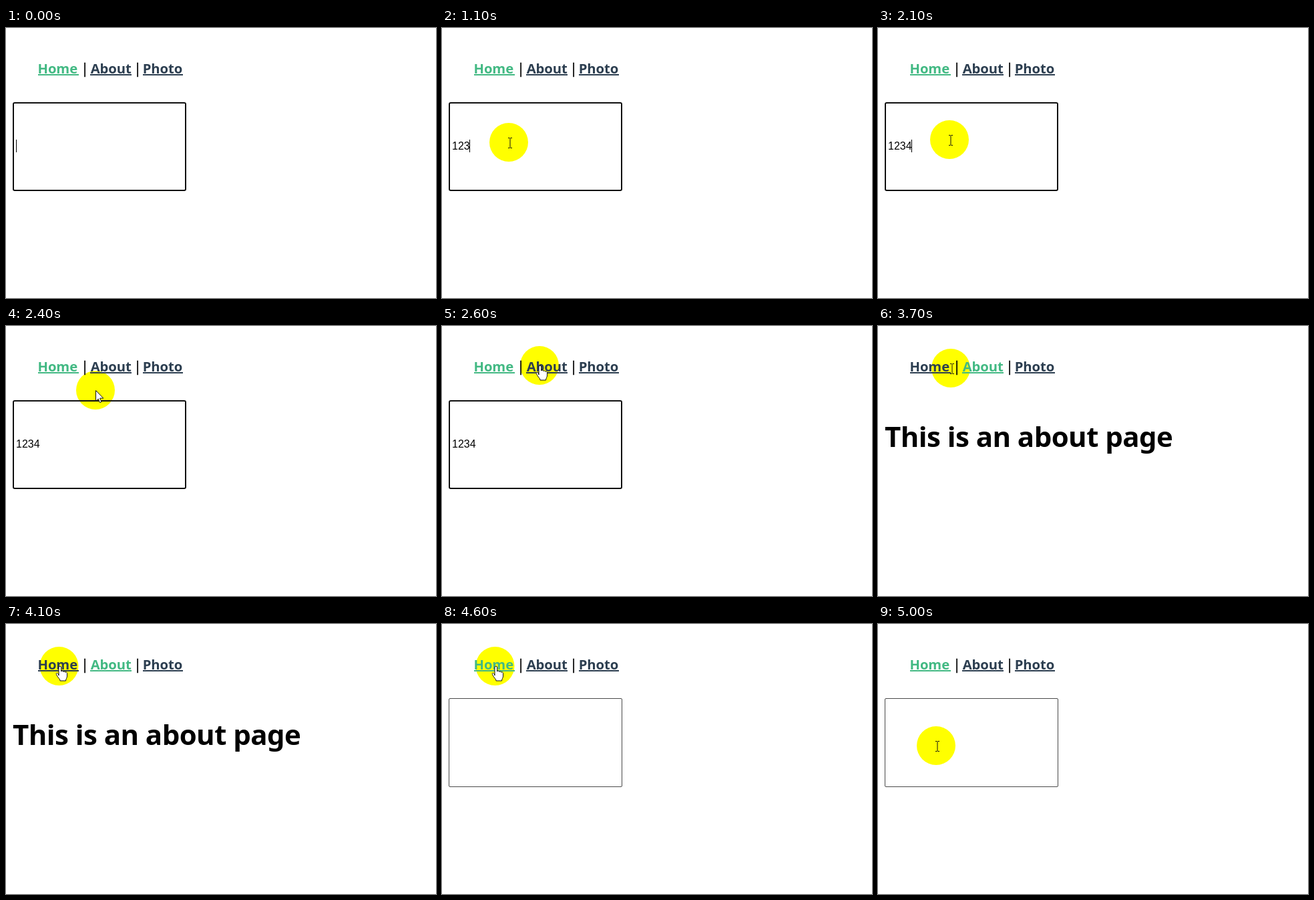
These frames come from a looping animation (644 px wide and 404 px high, 6000 ms). An HTML page:

```html
<!DOCTYPE html>
<html lang="en">
<head>
<meta charset="utf-8">
<title>Page navigation</title>
<style>
html, body { margin: 0; width: 100%; height: 100%; overflow: hidden; background: #fff; }
svg { display: block; width: 644px; height: 404px; }
.nav text { font: 700 20.3px "Noto Sans", "Open Sans", sans-serif; letter-spacing: -.1px; }
.nav .bar { font-weight: 400; font-size: 21.3px; letter-spacing: 0; text-anchor: middle; stroke: #000; stroke-width: .3; }
.link { fill: #2c3e50; }
.link.active { fill: #42b983; }
.title { font: 700 42px "Noto Sans", "Open Sans", sans-serif; letter-spacing: -.56px; }
.value { font: 16px "Liberation Sans", Arial, sans-serif; }
.spot { fill: #ff0; }
.pointer path { stroke: #111; stroke-width: 1; fill: none; }
.pointer .solid { fill: #fff; stroke-linejoin: round; }
</style>
</head>
<body>
<svg viewBox="0 0 644 404">
  <circle class="spot" id="spot" r="29"/>
  <g class="nav">
    <g class="link" id="home"><text x="47.5" y="68">Home</text><rect x="48" y="69" width="61" height="2"/></g>
    <text class="bar" x="118" y="68">|</text>
    <g class="link" id="about"><text x="126.7" y="68">About</text><rect x="126" y="69" width="62" height="2"/></g>
    <text class="bar" x="197" y="68">|</text>
    <g class="link"><text x="204.7" y="68">Photo</text><rect x="205" y="69" width="60" height="2"/></g>
  </g>
  <rect id="focused" x="11" y="112" width="258" height="131" rx="2" fill="none" stroke="#101010" stroke-width="2"/>
  <rect id="blurred" x="10.5" y="111.5" width="259" height="132" rx="1.5" fill="none" stroke="#4a4a4a"/>
  <text class="value" id="value" x="15" y="182"></text>
  <rect id="caret" y="167" width="1" height="19"/>
  <text class="title" id="title" x="10" y="180.5">This is an about page</text>
  <g class="pointer" id="pointer">
    <path id="beam" d="M-1 -6.5h2.5M2.5 -6.5h2.5M2 -6v14M-1 8.5h2.5M2.5 8.5h2.5"/>
    <path id="hand" class="solid" d="M-1 14V2a1.8 1.8 0 0 1 3.6 0V8a1.7 1.7 0 0 1 3.2 .6a1.7 1.7 0 0 1 3 .8a1.6 1.6 0 0 1 2.7 1.2V15c0 3-2 4-2 7H1c0-3-3-4-5.5-9.5c-1-2 1.2-3 2.4-1.2z"/>
    <path id="arrow" class="solid" d="M.5 .5v16l3.7-3.5 2.4 5.6 2.4-1-2.4-5.5h5.2z"/>
  </g>
</svg>
<script>
const LOOP = 6000, TICK = 100;
const el = id => document.getElementById(id);
const show = (id, on) => el(id).setAttribute("visibility", on ? "visible" : "hidden");

// time, x, y
const path = [
  [2000, 100, 171], [2100, 107, 167], [2300, 125, 124], [2500, 143, 68],
  [2600, 146, 59], [2700, 149, 57], [3100, 150, 55], [3400, 157, 56],
  [3500, 146, 54], [3700, 109, 63], [3900, 90, 67], [4000, 78, 65],
  [4100, 79.5, 63], [4600, 79.5, 63], [4700, 79, 74], [4800, 78, 98],
  [4900, 91, 150], [5000, 87, 182]
];
const typed = [[700, "1"], [900, "12"], [1100, "123"], [1800, "1234"]];
const caretOn = [[0, 300], [700, 1700], [1800, 2300]];
const BLUR = 2900, TO_ABOUT = 3000, TO_HOME = 4400;

function position(t) {
  const i = path.findIndex(p => p[0] >= t);
  if (i < 0) return path[path.length - 1].slice(1);
  if (i === 0) return path[0].slice(1);
  const [t0, x0, y0] = path[i - 1], [t1, x1, y1] = path[i];
  const k = (t - t0) / (t1 - t0);
  return [x0 + (x1 - x0) * k, y0 + (y1 - y0) * k];
}

function shape(x, y, about) {
  const inside = (l, t, r, b) => x >= l && x <= r && y >= t && y <= b;
  if (inside(48, 48, 108, 76) || inside(126, 48, 187, 76)) return "hand";
  if (inside(108, 48, 126, 76)) return "beam";
  return !about && inside(10, 111, 270, 244) ? "beam" : "arrow";
}

function draw(now) {
  const t = Math.floor(now % LOOP / TICK) * TICK;
  const about = t >= TO_ABOUT && t < TO_HOME;
  const focus = t < BLUR;

  el("home").classList.toggle("active", !about);
  el("about").classList.toggle("active", about);
  show("title", about);
  show("focused", focus);
  show("blurred", !focus && !about);

  const text = t < TO_ABOUT ? typed.reduce((s, [at, v]) => t >= at ? v : s, "") : "";
  el("value").textContent = text;
  el("caret").setAttribute("x", Math.floor(15 + 8.9 * text.length));
  show("caret", caretOn.some(([a, b]) => t >= a && t < b));

  const [x, y] = position(t);
  const kind = shape(x, y, about);
  const visible = t >= TICK;
  el("spot").setAttribute("transform", `translate(${x} ${y})`);
  el("pointer").setAttribute("transform", `translate(${Math.round(x)} ${Math.round(y)})`);
  show("spot", visible);
  for (const id of ["beam", "hand", "arrow"]) show(id, visible && id === kind);
}

const start = performance.now();
function frame() {
  draw(performance.now() - start);
  requestAnimationFrame(frame);
}
frame();
</script>
</body>
</html>
```
